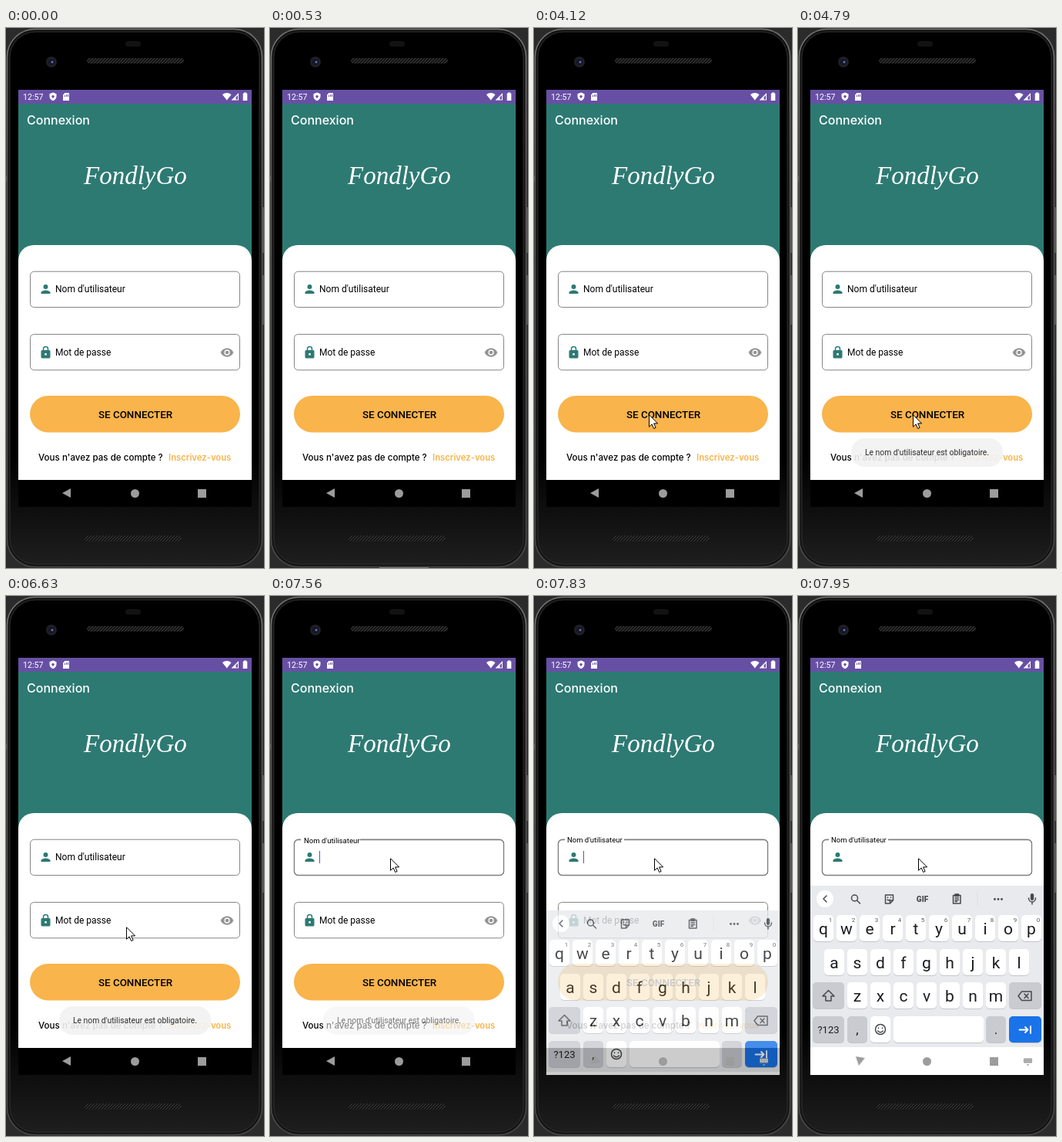
These frames come from a looping animation (335 by 699 pixels, 8000 ms). An HTML page:

```html
<!DOCTYPE html>
<html lang="fr">
<head>
<meta charset="utf-8">
<title>Connexion</title>
<style>
html, body { margin: 0; width: 100%; height: 100%; overflow: hidden; background: #2b2b2b; }
svg { display: block; width: 335px; height: 699px; font-family: Roboto, sans-serif; }
.ui { font-family: Inter, sans-serif; font-weight: 500; }
.mid { text-anchor: middle; }
.icon { fill-rule: evenodd; }
.line { fill: none; stroke: #46494d; stroke-width: 1.5; stroke-linecap: round; stroke-linejoin: round; }

/* every part changes in hard steps over one 8 s loop */
.anim { animation: 8s step-end infinite; }
#edge { animation-name: edge; opacity: 0; }
#pointer { animation-name: pointer; transform: translate(151px, 720px); }
#toast { animation-name: toast; opacity: 0; }
#label { animation-name: label; transform: translate(64px, 342px); }
#focus { animation-name: focus; opacity: 0; }
#caret { animation-name: caret; opacity: 0; }
#keyboard { animation-name: keyboard; opacity: 0; }
#back { animation-name: back; transform: translate(79px, 602px); }
#switch { animation-name: switch; opacity: 0; }

@keyframes edge { 0%, 30.75% { opacity: 0 } 6.625% { opacity: 1 } }
@keyframes pointer {
  0% { transform: translate(151px, 720px) }
  30.75% { transform: translate(152px, 654px) }
  32.625% { transform: translate(151px, 640px) }
  34.125% { transform: translate(151px, 588px) }
  35.625% { transform: translate(151px, 532px) }
  37.125% { transform: translate(151px, 507px) }
  39% { transform: translate(151px, 500px) }
  51.5% { transform: translate(149px, 500px) }
  82.875% { transform: translate(156px, 428px) }
  84.375% { transform: translate(156px, 367px) }
  86.25% { transform: translate(156px, 350px) }
  87.75% { transform: translate(156px, 342px) }
  89.25%, 100% { transform: translate(156px, 339px) }
}
@keyframes toast {
  0% { opacity: 0 }
  55.375% { opacity: .25 }
  56.875% { opacity: .6 }
  58.375% { opacity: .88 }
  59.875% { opacity: 1 }
  92.625% { opacity: .9 }
  94.5% { opacity: .65 }
  96.375% { opacity: .38 }
  97.875% { opacity: .12 }
  99.375%, 100% { opacity: 0 }
}
@keyframes label {
  0% { transform: translate(64px, 342px) }
  94.5% { transform: translate(44px, 320px) scale(.8) }
  96.375%, 100% { transform: translate(43px, 319px) scale(.79) }
}
@keyframes focus { 0% { opacity: 0 } 94.5%, 100% { opacity: 1 } }
@keyframes caret { 0%, 99.375%, 100% { opacity: 0 } 94.5% { opacity: 1 } }
@keyframes keyboard {
  0% { opacity: 0; transform: translateY(138px) }
  96.375% { opacity: .36; transform: translateY(138px) }
  97.875% { opacity: .8; transform: translateY(32px) }
  99.375%, 100% { opacity: 1; transform: none }
}
@keyframes back {
  0% { transform: translate(79px, 602px) }
  97.875% { transform: translate(79px, 602px) rotate(-38deg) }
  99.375%, 100% { transform: translate(80px, 602px) rotate(-80deg) }
}
@keyframes switch { 0% { opacity: 0 } 96.375%, 100% { opacity: 1 } }
</style>
</head>
<body>
<svg viewBox="0 0 335 699">
  <defs>
    <pattern id="mesh" width="4" height="4" patternUnits="userSpaceOnUse">
      <rect width="4" height="4" fill="#0c0c0c"/>
      <path d="M0 4 4 0M-1 1 1-1M3 5 5 3" stroke="#3c3c3c" stroke-width="1.2"/>
    </pattern>
    <linearGradient id="rim" x2="0" y2="1">
      <stop offset="0" stop-color="#777"/>
      <stop offset=".25" stop-color="#5c5c5c"/>
      <stop offset="1" stop-color="#484848"/>
    </linearGradient>
    <linearGradient id="glass" x2="0" y2="1">
      <stop offset=".8" stop-color="#000"/>
      <stop offset="1" stop-color="#1e1e1e"/>
    </linearGradient>
    <clipPath id="screen"><rect x="16" y="80" width="303" height="540"/></clipPath>
  </defs>

  <!-- phone body -->
  <rect width="335" height="699" fill="#2b2b2b"/>
  <path d="M0 191h2v8H0zM332 232h3v59h-3zM332 320h3v64h-3z" fill="#555"/>
  <rect x="1.5" y="1.5" width="331" height="696" rx="36" fill="#141414" stroke="url(#rim)" stroke-width="1.6"/>
  <rect x="5" y="5" width="324" height="689" rx="33" fill="url(#glass)" stroke="#303030"/>
  <rect x="155" y="17" width="20" height="7" rx="3.5" fill="#131313"/>
  <rect x="105" y="39" width="126" height="7" rx="3.5" fill="url(#mesh)"/>
  <rect x="102" y="657" width="126" height="7.5" rx="3.5" fill="url(#mesh)"/>
  <circle cx="59" cy="44" r="7" fill="#202024"/>
  <circle cx="59" cy="44" r="4" fill="#15152c"/>
  <circle cx="60" cy="44" r="1.5" fill="#6a70b0"/>

  <g clip-path="url(#screen)">
    <rect x="16" y="80" width="303" height="540"/>
    <rect x="16" y="98" width="303" height="220" fill="#2d7a73"/>
    <rect x="16" y="80" width="303" height="18" fill="#6750a4"/>

    <!-- status bar -->
    <g fill="#fff">
      <text x="22" y="93" font-size="10.6">12:57</text>
      <path class="icon" d="M61 83.5l4.5 1.8v3.2c0 2.7-1.9 4.9-4.5 5.7-2.6-.8-4.5-3-4.5-5.7v-3.2zM61 86.6l-2 2 2 2.6 2-2.6z"/>
      <path class="icon" d="M76.5 84H82v10h-8v-7.5zM76 87v2h1v-2zM78 86v3h1v-3zM80 86v3h1v-3z"/>
      <path d="M281 86.3c3.5-3 8-3 11.5 0L286.8 93.5z"/>
      <path class="icon" d="M302 84v9.500h-9.500zM301 87v5.500h-2.500v-3z"/>
      <path d="M309 83.5h3v1h1.300v9.500h-5.600v-9.500h1.300z"/>
    </g>

    <text class="ui" x="27" y="125" font-size="16" fill="#fff">Connexion</text>
    <text x="101" y="202" font-family="'Liberation Serif', serif" font-style="italic" font-size="33" fill="#fff">FondlyGo</text>

    <path d="M16 585V301a20 20 0 0 1 20-20H299a20 20 0 0 1 20 20V585z" fill="#fff"/>

    <!-- form -->
    <g fill="none" stroke="#858585">
      <rect x="31.5" y="315.2" width="272" height="46.3" rx="5"/>
      <rect x="31.5" y="396.5" width="272" height="46.3" rx="5"/>
    </g>
    <g id="focus" class="anim">
      <rect x="31.5" y="315.5" width="272" height="46" rx="5" fill="none" stroke="#808080" stroke-width="1.4"/>
      <rect x="40" y="313" width="77" height="5" fill="#fff"/>
    </g>
    <g id="label" class="anim"><text font-size="12">Nom d'utilisateur</text></g>
    <rect id="caret" class="anim" x="64" y="330" width="1" height="16" fill="#6750a4"/>
    <text x="64" y="424" font-size="12">Mot de passe</text>
    <g class="icon" fill="#2d7a73">
      <path transform="translate(42.5 329) scale(.75)" d="M12 12a4 4 0 1 0 0-8 4 4 0 0 0 0 8zm0 2c-2.7 0-8 1.3-8 4v2h16v-2c0-2.7-5.3-4-8-4z"/>
      <path transform="translate(42.5 411) scale(.75)" d="M18 8h-1V6A5 5 0 0 0 7 6v2H6a2 2 0 0 0-2 2v10a2 2 0 0 0 2 2h12a2 2 0 0 0 2-2V10a2 2 0 0 0-2-2zm-6 9a2 2 0 1 1 0-4 2 2 0 0 1 0 4zm3-9H9V6a3 3 0 0 1 6 0z"/>
      <path transform="translate(278 411) scale(.75)" fill="#8f8f8f" d="M12 4.5C7 4.5 2.7 7.6 1 12c1.7 4.4 6 7.5 11 7.5s9.3-3.1 11-7.5c-1.7-4.4-6-7.5-11-7.5zM12 17a5 5 0 1 1 0-10 5 5 0 0 1 0 10zm0-8a3 3 0 1 0 0 6 3 3 0 0 0 0-6z"/>
    </g>
    <rect x="31" y="476" width="273" height="47.5" rx="23.7" fill="#f9b44c"/>
    <text class="mid" x="168" y="505" font-size="13.4" font-weight="500">SE CONNECTER</text>
    <g class="ui">
      <text x="42" y="560" font-size="11.6">Vous n'avez pas de compte ?</text>
      <text x="211" y="560" font-size="11.3" font-weight="600" fill="#f9b44c">Inscrivez-vous</text>
    </g>

    <g id="toast" class="anim">
      <rect x="69" y="531" width="197" height="37" rx="18" fill="#f2f2f2" fill-opacity=".9"/>
      <text x="87" y="553" font-size="10.35" fill="#2b2b2b">Le nom d'utilisateur est obligatoire.</text>
    </g>

    <g id="keyboard" class="anim">
      <rect x="16" y="375" width="303" height="210" fill="#e8eaed"/>
      <rect x="16" y="584" width="303" height="36" fill="#fff"/>
      <g id="keys"></g>

      <!-- toolbar -->
      <circle cx="35" cy="392" r="11" fill="#fff"/>
      <path d="M233 383v18" stroke="#dcdee1"/>
      <g class="line">
        <path d="M37 388l-4 4 4 4"/>
        <circle cx="73.5" cy="391" r="4"/>
        <path d="M76.5 394l4 4"/>
        <path d="M113.5 387h10v7l-4 4h-6zM119.5 398v-4h4M116.5 390v.5M120.5 390v.5M116 393q1.500 1.800 3 0"/>
        <path d="M201.5 387.5h9.5v10.5h-9.5zM204 386h4.5v2.5h-4.5zM204 391h4.5M204 393.5h4.5M204 395.5h2.5"/>
        <path d="M299.5 391a4.5 5 0 0 0 9 0M304 396v3"/>
      </g>
      <g fill="#46494d">
        <rect x="301.8" y="385" width="4.4" height="9" rx="2.2"/>
        <circle cx="255.5" cy="392.5" r="1.4"/><circle cx="260" cy="392.5" r="1.4"/><circle cx="264.5" cy="392.5" r="1.4"/>
        <text class="mid" x="161.5" y="396" font-size="10" font-weight="900">GIF</text>
      </g>

      <!-- special keys -->
      <g class="line">
        <path d="M39.5 510.5l7.5 7.5h-4v6h-7v-6h-4z"/>
        <path d="M290.5 512h12.5v11.5h-12.5l-4.5-5.75zM294 515l5 5.5M299 515l-5 5.5"/>
        <circle cx="107" cy="561" r="6.5"/>
        <path d="M104.5 559v.5M109.5 559v.5M103.7 563q3.3 3.6 6.6 0"/>
        <path d="M287.5 561.5h11M295 558l3.5 3.5-3.5 3.5M302 557v9" stroke="#fff" stroke-width="1.8"/>
      </g>
    </g>

    <!-- navigation bar -->
    <g fill="#9c9c9c">
      <path id="back" class="anim" d="M-6 0 5-6V6z"/>
      <circle cx="167.5" cy="602.5" r="5.5"/>
      <rect x="249" y="597" width="11" height="11"/>
      <g id="switch" class="anim">
        <rect x="293" y="598.5" width="11" height="6" rx=".8"/>
        <path d="M294 600.5h9M294 602.5h9" stroke="#eee" stroke-width=".8" stroke-dasharray="1 1"/>
        <path d="M296.5 606.2h4l-2 2z"/>
      </g>
    </g>
  </g>

  <rect id="edge" class="anim" x="142" y="698" width="64" height="1" fill="#767676"/>
  <path id="pointer" class="anim" d="M.5.8V16.3l3.6-3.4 2.5 5.6 2.5-1.1-2.5-5.5h5z" fill="#fff" stroke="#000"/>
</svg>
<script>
const keys = document.getElementById('keys');

function add(tag, attrs, text = '') {
  const el = document.createElementNS('http://www.w3.org/2000/svg', tag);
  for (const name in attrs) el.setAttribute(name, attrs[name]);
  el.textContent = text;
  keys.append(el);
}

function key(x, y, width, fill, text, size = 21) {
  add('rect', { x, y: y + 1, width, height: 34, rx: 5, fill: '#c3c5c9' });
  add('rect', { x, y, width, height: 34, rx: 5, fill });
  if (text) add('text', { class: 'mid', x: x + width / 2, y: y + 17.5 + size * .35, 'font-size': size, fill: '#1b1c1e' }, text);
}

const white = '#fff', grey = '#c9cbd1';
[['qwertyuiop', 20, 413], ['asdfghjkl', 34, 457], ['zxcvbnm', 64, 500]].forEach(([row, x, y]) =>
  [...row].forEach((letter, i) => key(x + 30 * i, y, 26, white, letter)));

for (let i = 0; i < 10; i++)
  add('text', { class: 'mid', x: 42 + 30 * i, y: 422, 'font-size': 8, fill: '#55585c' }, (i + 1) % 10);

key(19, 500, 41, grey);
key(274, 500, 42, grey);
key(19, 544, 41, grey, '?123', 13);
key(64, 544, 26, grey, ',', 17);
key(94, 544, 26, white);
key(124, 544, 117, white);
key(244, 544, 26, grey, '.', 17);
key(274, 544, 42, '#1a73e8');
</script>
</body>
</html>
```
